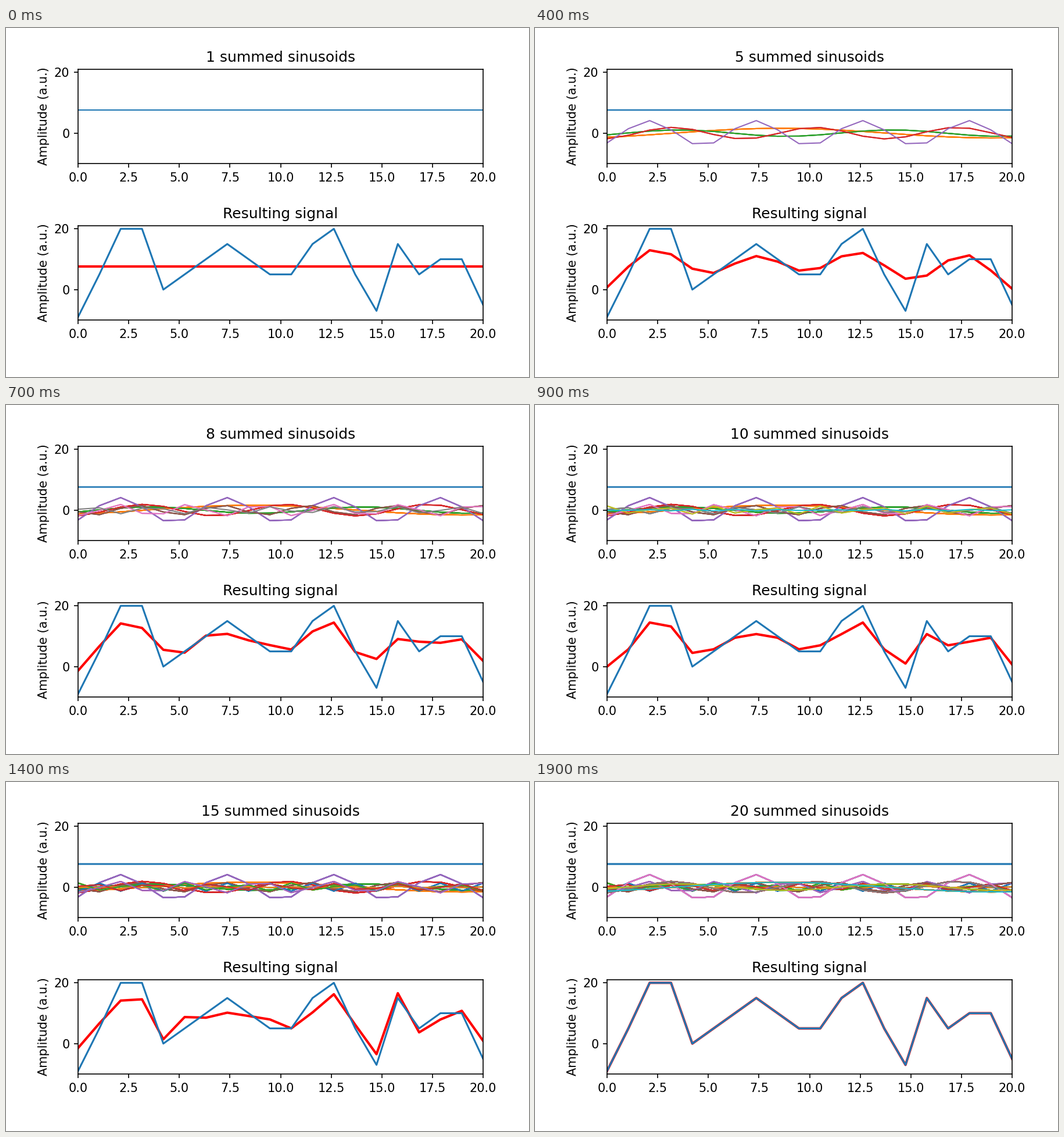
A matplotlib script for the animation above (2000 ms loop, 900 by 600 pixels).

```python
import numpy as np
import matplotlib.pyplot as plt
from matplotlib.animation import FuncAnimation

W, H, DPI = 900, 600, 150

signal = np.array([-9, 5, 20, 20, 0, 5, 10, 15, 10, 5,
                   5, 15, 20, 5, -7, 15, 5, 10, 10, -5], float)
N = len(signal)
x = np.linspace(0, 20, N)

# Real part of every Fourier component, one row per frequency
coef = np.fft.fft(signal) / N
k = np.arange(N)
waves = (coef[:, None] * np.exp(2j * np.pi * np.outer(k, k) / N)).real
partial = np.cumsum(waves, axis=0)

fig = plt.figure(figsize=(W / DPI, H / DPI), dpi=DPI, facecolor="white")


def make_axes(top, bottom, title):
    left, right = 124, 821
    ax = fig.add_axes([left / W, 1 - bottom / H,
                       (right - left) / W, (bottom - top) / H])
    ax.set_xlim(0, 20)
    ax.set_ylim(-10, 21)
    ax.set_xticks(np.arange(0, 20.1, 2.5))
    ax.set_yticks([0, 20])
    ax.set_ylabel("Amplitude (a.u.)")
    ax.set_title(title)
    return ax


ax_parts = make_axes(71, 233, "")
ax_sum = make_axes(340, 502, "Resulting signal")

# Each step redraws all components so far over the earlier ones
batches = [[ax_parts.plot(x, waves[i], lw=1, color=f"C{i % 10}")[0]
            for i in range(step + 1)] for step in range(N)]

total, = ax_sum.plot(x, partial[0], color="red", lw=2)
ax_sum.plot(x, signal, color="C0", lw=1.5)


def update(frame):
    for step, batch in enumerate(batches):
        for line in batch:
            line.set_visible(step <= frame)
    total.set_ydata(partial[frame])
    ax_parts.set_title(f"{frame + 1} summed sinusoids")
    return []


anim = FuncAnimation(fig, update, frames=N, init_func=lambda: update(0),
                     interval=100, repeat=True, repeat_delay=0, blit=False)
plt.show()
```
